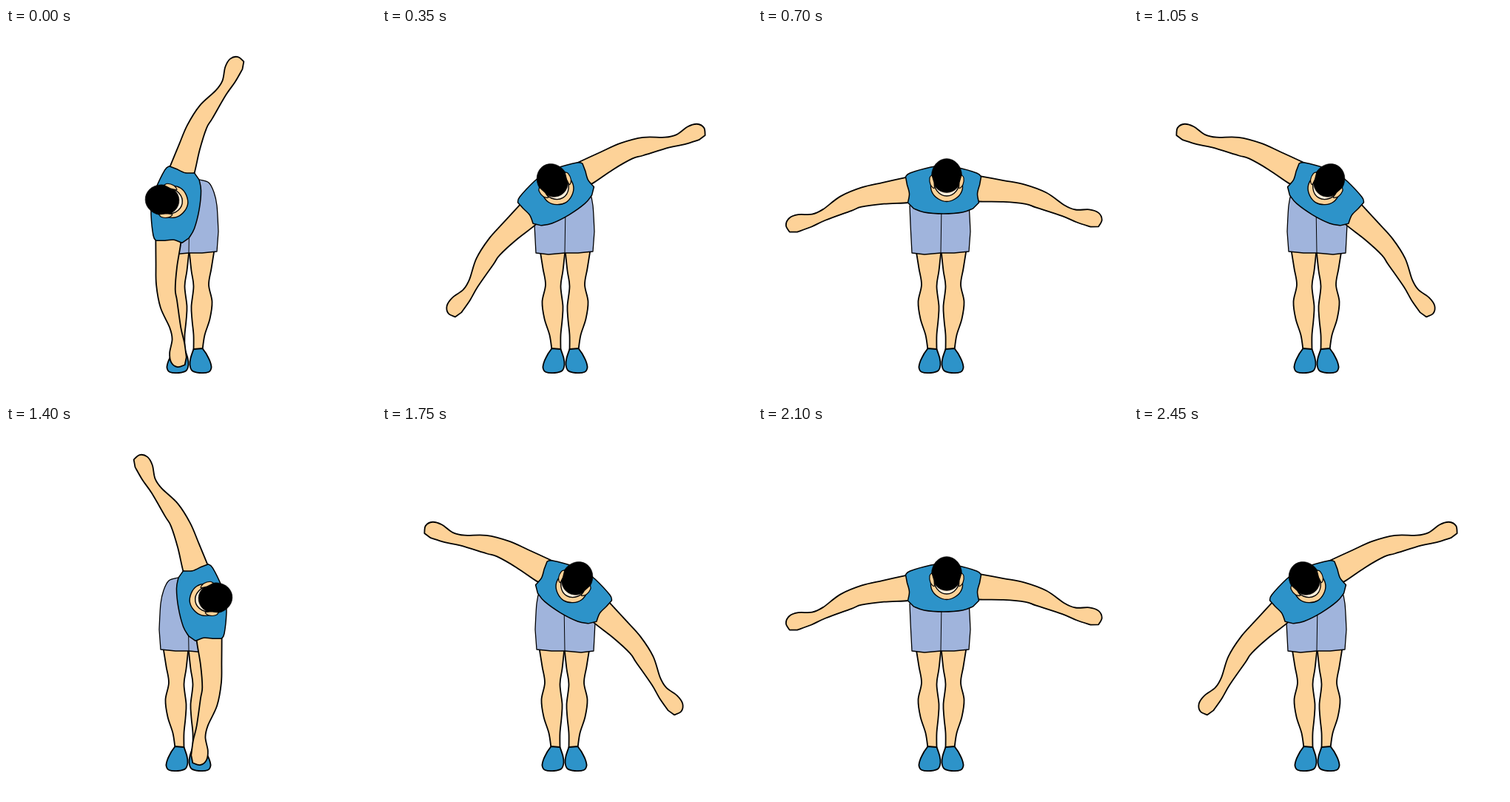
Recreate the animation shown at these times as an HTML page with a canvas. Size 500 by 500 pixels, loop 2800 ms.

```html
<!DOCTYPE html>
<html lang="en">
<head>
<meta charset="utf-8">
<title>Windmill stretch</title>
<style>
html, body { margin: 0; width: 100%; height: 100%; overflow: hidden; background: #fff; }
canvas { display: block; width: 100vw; height: 100vh; }
</style>
</head>
<body>
<canvas id="stage" width="500" height="500"></canvas>
<script>
const ctx = document.getElementById('stage').getContext('2d');
const SKIN = '#fdd298', SHIRT = '#2d93c9', SHORTS = '#a0b4dc', INK = '#000';
const STEP = 350, AXIS = 494, MIDLINE = 247.5;
const radians = deg => deg * Math.PI / 180;

// Smooth closed curve through key points; "/" marks a sharp corner.
function curve(text) {
  const path = new Path2D();
  text.split('/').forEach((run, r) => {
    const p = run.trim().split(/\s+/).map(s => s.split(',').map(Number));
    if (r) path.lineTo(...p[0]); else path.moveTo(...p[0]);
    for (let i = 0; i < p.length - 1; i++) {
      const a = p[i - 1] || p[i], b = p[i], c = p[i + 1], d = p[i + 2] || c;
      path.bezierCurveTo(
        b[0] + (c[0] - a[0]) / 6, b[1] + (c[1] - a[1]) / 6,
        c[0] - (d[0] - b[0]) / 6, c[1] - (d[1] - b[1]) / 6, c[0], c[1]);
    }
  });
  path.closePath();
  return path;
}

// Completes a right half, given from top centre to bottom centre.
function symmetric(half) {
  const left = half.trim().split(/\s+/).reverse()
    .map(s => s === '/' ? s : -s.split(',')[0] + ',' + s.split(',')[1]);
  return curve(half + ' ' + left.slice(1).join(' '));
}

function oval(y, rx, ry) {
  const path = new Path2D();
  path.ellipse(0, y, rx, ry, 0, 0, Math.PI * 2);
  return path;
}

// Legs and shoes are measured from the midline, the arm from its shoulder.
const leg = curve('34,300 30,325 26.5,347 31,370 28,393 21,415 18,435 / 6,435 6,415 4,395 3,376 6,349 3,328 0,300');
const shoe = curve('6,434 18,433 / 23,440 28,450 30,459 26,465 14,466 4,463 1,455 2,446 6,434');
const shorts = curve('205,240 206,265 208,304 / 225,306 247,304 / 265,304 285,302 / 287,275 285,240 281,222 274,209 262,205');
const arm = curve('-9,-16 28,-19 57,-21 88,-18 116,-8 132,-6 150,-11 163,-10 170,-2 168,8 / 158,11 138,10 117,7 80,5 65,4 35,9 3,17 -9,17');
const torso = symmetric('0,-32 17,-30 45,-22 51,-17 / 49,-6 46,6 48,18 / 40,26 26,31 0,33');
const collar = symmetric('0,4 16,4 21,10 20,22 12,31 0,35');
const ear = curve('20,-1 23,3 22,12 17,17 17,9');
const brow = oval(4, 18.5, 23.5), hair = oval(0, 20.5, 23);

function paint(path, fill, width = 1.8) {
  ctx.fillStyle = fill;
  ctx.lineWidth = width;
  ctx.fill(path);
  ctx.stroke(path);
}

function within(x, y, deg, draw) {
  ctx.save();
  ctx.translate(x, y);
  ctx.rotate(radians(deg));
  draw();
  ctx.restore();
}

function bothSides(draw) {
  for (const side of [-1, 1]) {
    ctx.save();
    ctx.scale(side, 1);
    draw();
    ctx.restore();
  }
}

function drawLower() {
  within(MIDLINE, 0, 0, () => bothSides(() => {
    paint(leg, SKIN);
    paint(shoe, SHIRT);
  }));
  paint(shorts, SHORTS, 1.3);
  ctx.lineWidth = 1;
  ctx.beginPath();
  ctx.moveTo(248, 240);
  ctx.lineTo(247, 304);
  ctx.stroke();
}

function drawHead() {
  paint(collar, SKIN, 1.4);
  paint(brow, '#fff0dc', 1.4);
  paint(hair, INK, 0.5);
  bothSides(() => paint(ear, SKIN, 1.2));
}

function drawUpper({ x, y, turn, swing }) {
  within(x, y, turn, () => {
    within(0, 0, swing, () => bothSides(() =>
      within(49.5, 0, 16, () => paint(arm, SKIN))));
    paint(torso, SHIRT, 1.5);
    within(4.5, -18.5, 0, drawHead);
  });
}

const flat = { x: 250.5, y: 218, turn: 0, swing: -1 };
const tilt = { x: 236, y: 224, turn: -31, swing: -5 };
const reach = { x: 228.5, y: 240, turn: -80, swing: 1 };
const swingOut = [reach, tilt, flat, tilt];

// A full cycle visits left reach, flat, right reach, flat.
function drawStep(step) {
  const mirrored = step >= 3 && step <= 5;
  ctx.save();
  if (mirrored) ctx.transform(-1, 0, 0, 1, AXIS, 0);
  drawLower();
  drawUpper(swingOut[step % 4]);
  ctx.restore();
}

ctx.strokeStyle = INK;
ctx.lineJoin = 'round';
const start = performance.now();

function frame() {
  ctx.fillStyle = '#fff';
  ctx.fillRect(0, 0, 500, 500);
  drawStep(Math.floor((performance.now() - start) / STEP) % 8);
  requestAnimationFrame(frame);
}
frame();
</script>
</body>
</html>
```
